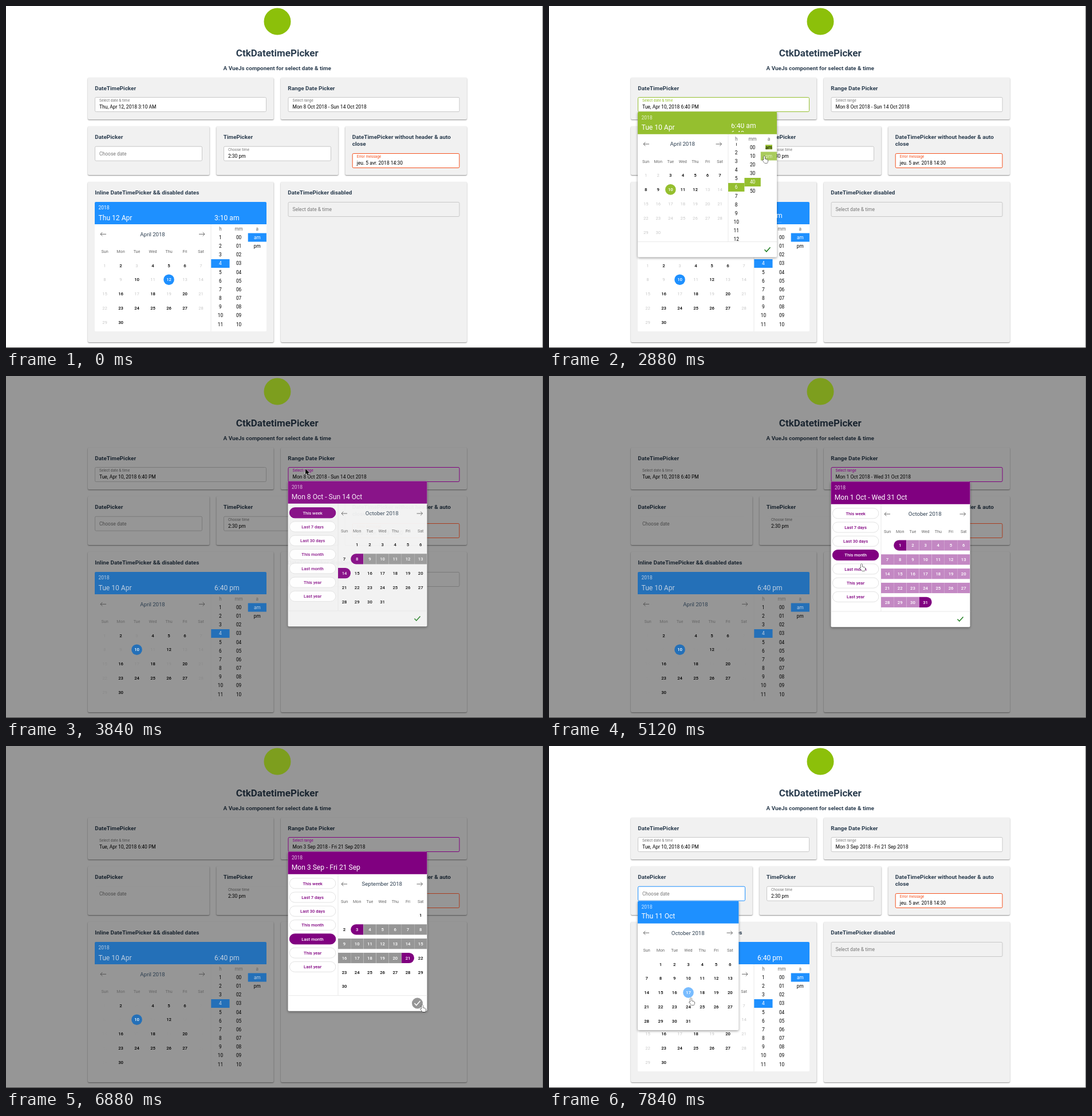
Write an HTML page with a canvas that moves like this. It is 938 px wide and 597 px high and loops after 8000 ms.

```html
<!DOCTYPE html>
<html lang="en">
<head>
<meta charset="utf-8">
<title>Date picker demo</title>
<style>
  html, body { margin: 0; width: 100%; height: 100%; overflow: hidden; background: #fff; }
  canvas { display: block; }
</style>
</head>
<body>
<canvas id="stage" width="938" height="597"></canvas>
<script>
const ctx = document.getElementById('stage').getContext('2d');
const LOOP = 8000, STEP = 160;
const GREEN = '#95bf2f', PURPLE = '#800080', BLUE = '#1e90ff', DARK = '#2c3e50';
const WEEK = ['Sun', 'Mon', 'Tue', 'Wed', 'Thu', 'Fri', 'Sat'];
const MONTHS = {
  Apr: { name: 'April 2018', start: 0, days: 30 },
  Sep: { name: 'September 2018', start: 6, days: 30 },
  Oct: { name: 'October 2018', start: 1, days: 31 }
};
const HOURS = Array.from({ length: 12 }, (_, i) => `${i + 1}`);
const MINUTES = Array.from({ length: 11 }, (_, i) => `${i}`.padStart(2, '0'));
const TENS = ['00', '10', '20', '30', '40', '50'];
const SHORTCUTS = ['This week', 'Last 7 days', 'Last 30 days', 'This month', 'Last month', 'This year', 'Last year'];
const OPEN_DAYS = new Set([2, 4, 5, 6, 10, 12, 16, 18, 20, 23, 24, 25, 26, 27, 30]);

// Values by start time
const DATES = [[0, 'Thu 12 Apr'], [1560, 'Tue 10 Apr']];
const TIMES = [[0, '3:10 am'], [1900, '6:10 am'], [2220, '6:40 am'], [2800, '6:40 pm']];
const RANGES = [
  [0, { month: 'Oct', from: 8, to: 14, shortcut: 0 }],
  [4700, { month: 'Oct', from: 1, to: 31, shortcut: 3 }],
  [5300, { month: 'Sep', from: 1, to: 30, shortcut: 4 }],
  [5980, { month: 'Sep', from: 3, to: 0, shortcut: 4 }],
  [6380, { month: 'Sep', from: 3, to: 21, shortcut: 4 }]
];
// Pointer path: time, x, y
const PATH = [
  [320, 74, 498], [880, 225, 173], [1200, 225, 173], [1500, 211, 318], [1640, 211, 318],
  [1850, 326, 315], [1980, 326, 315], [2180, 355, 306], [2400, 355, 306], [2640, 376, 262],
  [2900, 376, 262], [3160, 381, 424], [3300, 381, 424], [3600, 523, 162], [4200, 523, 162],
  [4640, 536, 312], [4800, 536, 312], [5120, 546, 328], [5280, 546, 335], [5440, 546, 335],
  [5900, 613, 319], [6060, 613, 319], [6350, 700, 368], [6500, 700, 368], [6800, 724, 450],
  [6880, 727, 452], [7000, 727, 452], [7420, 250, 256], [7520, 250, 256], [7840, 248, 440]
];
const ARROW = new Path2D('M0 0V10L2.3 7.8 4 11.5 5.8 10.7 4.2 7.2H7.3Z');
const HAND = new Path2D('M2.5 1a1 1 0 0 1 2 0V5l4 1q1.5.4 1.3 2L9 12H4L.5 7.5q-.3-1.2 1-1l1 1Z');

let t = 0, skin = {};

const clamp = v => Math.min(1, Math.max(0, v));
const between = (a, b) => t >= a && t < b;
const current = list => list.filter(([start]) => start <= t).pop()[1];
const mix = (a, b, k) => `rgb(${a.map((v, i) => Math.round(v + (b[i] - v) * k))})`;
const gray = (a, b, k) => mix([a, a, a], [b, b, b], k);
const presence = (open, close) => clamp((t - open) / 240) * (1 - clamp((t - close) / 160));

function isolated(draw) {
  ctx.save();
  draw();
  ctx.restore();
}

// y is the centre of the capitals and digits
function text(str, x, y, size, color, weight = 400, align = 'left') {
  ctx.font = `${weight} ${size}px Roboto, sans-serif`;
  ctx.textAlign = align;
  ctx.fillStyle = color;
  ctx.fillText(str, x, y + size * 0.356);
}

function box(x, y, w, h, fill, radius = 0, stroke) {
  ctx.beginPath();
  ctx.roundRect(x, y, w, h, radius);
  if (fill) { ctx.fillStyle = fill; ctx.fill(); }
  if (stroke) { ctx.strokeStyle = stroke; ctx.lineWidth = 1; ctx.stroke(); }
}

function disc(x, y, r, fill) {
  ctx.beginPath();
  ctx.arc(x, y, r, 0, 7);
  ctx.fillStyle = fill;
  ctx.fill();
}

function line(points, color, width = 0.8) {
  ctx.beginPath();
  points.forEach(([x, y]) => ctx.lineTo(x, y));
  ctx.strokeStyle = color;
  ctx.lineWidth = width;
  ctx.stroke();
}

function navArrow(x, y, dir) {
  line([[x - 5 * dir, y], [x + 5 * dir, y]], '#444');
  line([[x + 1.7 * dir, y - 3.3], [x + 5 * dir, y], [x + 1.7 * dir, y + 3.3]], '#444');
}

function shadowed(blur, dy, alpha, draw) {
  isolated(() => {
    ctx.shadowColor = `rgba(0,0,0,${alpha})`;
    ctx.shadowBlur = blur;
    ctx.shadowOffsetY = dy;
    draw();
  });
}

function card(x, y, w, h, title) {
  shadowed(2, 1, 0.45, () => box(x, y, w, h, skin.card, 2));
  title.forEach((row, i) => text(row, x + 12.3, y + 18.7 + i * 12.2, 9.95, skin.title, 700));
}

function field(x, y, w, label, value, accent, disabled) {
  box(x + 0.5, y + 0.5, w - 1, 25, disabled ? skin.card : skin.field, 2, accent || skin.border);
  if (!value) return text(label, x + 8, y + 12.8, 8.5, skin.label);
  text(label, x + 8, y + 6, 6.6, accent || skin.label);
  text(value, x + 8, y + 17.3, 8.5, '#000');
}

// Old value leaves upwards while the new one arrives from below
function rolling(list, x, y, color) {
  const index = list.filter(([start]) => start <= t).length - 1;
  const p = index ? clamp((t - list[index][0]) / 320) : 1;
  isolated(() => {
    ctx.beginPath();
    ctx.rect(x - 2, y - 7, 100, 15);
    ctx.clip();
    if (p < 1) text(list[index - 1][1], x, y - 14 * p, 12.1, color);
    text(list[index][1], x, y + 14 * (1 - p), 12.1, color);
  });
}

function calendar({ x, dx, y, left, right, month, enabled = () => true, mark = () => null }) {
  const { name, start, days } = MONTHS[month];
  navArrow(left, y, -1);
  navArrow(right, y, 1);
  text(name, (left + right) / 2, y, 9.6, DARK, 400, 'center');
  WEEK.forEach((day, i) => text(day, x + i * dx, y + 30, 7.2, '#666', 400, 'center'));
  for (let d = 1; d <= days; d++) {
    const slot = d + start - 1;
    const cx = x + slot % 7 * dx, cy = y + 54.6 + Math.floor(slot / 7) * 24.8;
    const color = mark(d, cx, cy) || (enabled(d) ? '#000' : skin.muted);
    text(d, cx, cy, 7.7, color, enabled(d) ? 500 : 400, 'center');
  }
}

function circled(day, color) {
  return (d, x, y) => {
    if (d !== day) return null;
    disc(x, y, 9.3, color);
    return '#fff';
  };
}

function column(list, x, w, y, selected, color) {
  list.forEach((item, i) => {
    const cy = y + i * 15.17, on = item === selected;
    if (on) box(x, cy - 7.5, w, 15, color);
    text(item, x + w / 2, cy, 8.3, on ? skin.onAccent : '#000', 400, 'center');
  });
}

function columnHeads(x, w, y) {
  ['h', 'mm', 'a'].forEach((s, i) => text(s, x + w * (i + 0.5), y, 8.2, '#666', 400, 'center'));
}

function check(x, y, hover) {
  if (hover) disc(x, y, 9.5, hover);
  line([[x - 5, y], [x - 1.7, y + 3.5], [x + 5, y - 4]], hover ? '#fff' : '#1e7d1e', 1.5);
}

function popup(p, x, y, w, h, color, draw) {
  if (p <= 0) return;
  isolated(() => {
    ctx.globalAlpha = p;
    ctx.translate(0, -12 * (1 - p));
    shadowed(4, 1.5, 0.4, () => box(x, y, w, h, '#fff', 2));
    box(x, y, w, 39.3, color, [2, 2, 0, 0]);
    text('2018', x + 6.5, y + 10.4, 8.5, 'rgba(255,255,255,.8)');
    draw();
  });
}

function rangeText(year) {
  const { month, from, to } = current(RANGES);
  const show = d => d ? `${WEEK[(d + MONTHS[month].start - 1) % 7]} ${d} ${month}${year}` : '...';
  return `${show(from)} - ${show(to)}`;
}

function fieldStamp() {
  const [day, date, month] = current(DATES).split(' ');
  return `${day}, ${month} ${date}, 2018 ${current(TIMES).toUpperCase()}`;
}

function page() {
  box(0, 0, 938, 597, skin.page);
  disc(474, 27, 23.5, skin.logo);
  text('CtkDatetimePicker', 473.7, 81.5, 17, skin.title, 700, 'center');
  text('A VueJs component for select date & time', 473.7, 108.5, 9.95, skin.title, 700, 'center');

  card(143, 125, 324.5, 73, ['DateTimePicker']);
  card(480, 125, 325, 73, ['Range Date Picker']);
  card(143, 210, 212.5, 85, ['DatePicker']);
  card(367.5, 210, 213, 85, ['TimePicker']);
  card(592.5, 210, 212.5, 85, ['DateTimePicker without header & auto', 'close']);
  card(143, 307, 324.5, 280, ['Inline DateTimePicker && disabled dates']);
  card(480, 307, 325, 280, ['DateTimePicker disabled']);

  field(155, 159, 300, 'Select date & time', fieldStamp(), between(940, 3300) && GREEN);
  field(492.5, 159, 300, 'Select range', rangeText(' 2018'), between(3620, 6960) && PURPLE);
  field(155, 244.7, 188, 'Choose date', '', t >= 7460 && BLUE);
  field(380, 244.7, 188, 'Choose time', '2:30 pm');
  field(604.7, 257, 187.7, 'Error message', 'jeu. 5 avr. 2018 14:30', skin.error);
  field(492.5, 342, 300, 'Select date & time', '', null, true);
  inlinePicker();
}

function inlinePicker() {
  box(155, 342, 300, 226, skin.field, 2);
  box(155, 342, 300, 39, skin.blue, [2, 2, 0, 0]);
  text('2018', 161.5, 352.3, 8.5, skin.onAccent);
  rolling(DATES, 161.5, 369.2, skin.onAccent);
  rolling(TIMES, 364, 369.2, skin.onAccent);
  line([[358, 381], [358, 568]], skin.rule);
  calendar({
    x: 172.5, dx: 28, y: 398.3, left: 170, right: 342, month: 'Apr',
    enabled: d => OPEN_DAYS.has(d),
    mark: circled(Number(current(DATES).split(' ')[1]), skin.blue)
  });
  columnHeads(358.3, 32.2, 389.5);
  column(HOURS.slice(0, 11), 358.3, 32.2, 404, '4', skin.blue);
  column(MINUTES, 390.5, 32.2, 404, null);
  column(['am', 'pm'], 422.7, 32.2, 404, 'am', skin.blue);
}

function dateTimePopup() {
  popup(presence(940, 3300), 155, 184.5, 243, 254, GREEN, () => {
    const [hour, minute, half] = current(TIMES).split(/[: ]/);
    rolling(DATES, 161.5, 212, '#fff');
    rolling(TIMES, 318, 212, '#fff');
    line([[313, 224], [313, 411]], '#e4e4e4');
    line([[155, 411.5], [398, 411.5]], '#e4e4e4');
    calendar({
      x: 169.2, dx: 21.55, y: 241, left: 170, right: 296.5, month: 'Apr',
      enabled: d => d > 2 && d < 13,
      mark: circled(Number(current(DATES).split(' ')[1]), GREEN)
    });
    columnHeads(313, 28.4, 232);
    isolated(() => {
      ctx.beginPath();
      ctx.rect(313, 239, 85, 172);
      ctx.clip();
      column(HOURS, 313, 28.4, 240.6, hour, GREEN);
      column(TENS, 341.4, 28.4, 246.8, minute, GREEN);
      const switching = between(2640, 2960);
      column(['am', 'pm'], 369.8, 28.4, 246.8, switching ? null : half, GREEN);
      if (switching) {
        if (half === 'pm') box(378, 242.3, 12, 8, GREEN);
        else box(369.8, 239.3, 28.4, 15, GREEN);
        box(369.8, 254.5, 28.4, 15, '#a9cb5c');
        text('am', 384, 246.8, 8.3, half === 'pm' ? '#000' : '#fff', 400, 'center');
        text('pm', 384, 262, 8.3, '#e4efcb', 400, 'center');
      }
    });
    if (between(1040, 1440)) box(337.3, 248, 5, 160, '#7d7d7d', 2.5);
    check(381.5, 425.3, between(3080, 3300) && GREEN);
  });
}

function rangePopup() {
  const { month, from, to, shortcut } = current(RANGES);
  const extra = month === 'Sep' ? 24.6 : 0;
  const soft = between(4640, 5800) ? '#c388c3' : '#969696';
  popup(presence(3620, 6960), 492.5, 184.5, 243, 253.7 + extra, PURPLE, () => {
    text(rangeText(''), 498.7, 212, 12.1, '#fff');
    line([[580, 224], [580, 411 + extra]], '#e4e4e4');
    line([[492.5, 411 + extra], [735.5, 411 + extra]], '#e4e4e4');
    SHORTCUTS.forEach((label, i) => {
      const y = 239.8 + i * 24.27, on = i === shortcut;
      box(495.3, y - 9, 80.5, 18, on ? PURPLE : '#fff', 9, on ? PURPLE : '#e2e2e2');
      text(label, 535.6, y, 7.6, on ? '#fff' : PURPLE, 500, 'center');
    });
    calendar({
      x: 591, dx: 22.2, y: 241, left: 591, right: 722.5, month,
      mark(d, x, y) {
        if (d !== from && (d < from || d > to)) return null;
        const edge = d === from || d === to;
        const corners = d === from ? [9, 0, 0, 9] : d === to ? [0, 9, 9, 0] : 0;
        box(x - 11, y - 9.1, 22, 18.2, edge ? PURPLE : soft, corners);
        return '#fff';
      }
    });
    check(718.5, 424.5 + extra, between(6720, 7200) && '#969696');
  });
}

function datePopup() {
  popup(presence(7460, 9000), 155, 270.5, 176.3, 225.5, BLUE, () => {
    text('Thu 11 Oct', 161.5, 297, 12.1, '#fff');
    calendar({
      x: 170.6, dx: 24.28, y: 326.2, left: 170, right: 315.5, month: 'Oct',
      mark: circled(t >= 7760 ? 17 : 0, '#78bcff')
    });
  });
}

function pointer() {
  if (t < PATH[0][0]) return;
  const next = PATH.findIndex(([time]) => time > t);
  const b = next < 0 ? PATH[PATH.length - 1] : PATH[next];
  const a = next < 0 ? b : PATH[next - 1];
  const p = a === b ? 0 : (t - a[0]) / (b[0] - a[0]);
  const eased = p * p * (3 - 2 * p);
  const hand = between(1440, 3360) || between(4480, 7040) || t >= 7600;
  isolated(() => {
    ctx.translate(a[1] + (b[1] - a[1]) * eased - (hand ? 3.5 : 0), a[2] + (b[2] - a[2]) * eased);
    ctx.lineWidth = 1;
    ctx.strokeStyle = hand ? '#000' : '#fff';
    ctx.fillStyle = hand ? '#fff' : '#000';
    ctx.stroke(hand ? HAND : ARROW);
    ctx.fill(hand ? HAND : ARROW);
  });
}

function render(now) {
  t = Math.floor(now % LOOP / STEP) * STEP;
  const dim = clamp((t - 3620) / 160) * (1 - clamp((t - 6960) / 200));
  const flat = dim === 1 && t >= 4000;
  skin = {
    page: gray(255, 150, dim),
    card: gray(241, 150, dim),
    field: gray(255, 150, dim),
    border: gray(200, flat ? 150 : 122, dim),
    rule: gray(228, 150, dim),
    muted: gray(200, flat ? 150 : 140, dim),
    label: gray(120, 75, dim),
    title: mix([44, 62, 80], [26, 37, 48], dim),
    blue: mix([30, 144, 255], [36, 112, 184], dim),
    onAccent: mix([255, 255, 255], [190, 206, 224], dim),
    error: mix([244, 81, 30], [170, 62, 32], dim),
    logo: mix([140, 192, 10], [125, 158, 30], dim)
  };
  page();
  skin.onAccent = '#fff';
  skin.muted = '#c8c8c8';
  dateTimePopup();
  rangePopup();
  datePopup();
  box(937, 0, 1, 597, '#777');
  box(0, 596, 938, 1, '#444');
  pointer();
}

function loop(now) {
  render(now);
  requestAnimationFrame(loop);
}
requestAnimationFrame(loop);
</script>
</body>
</html>
```
